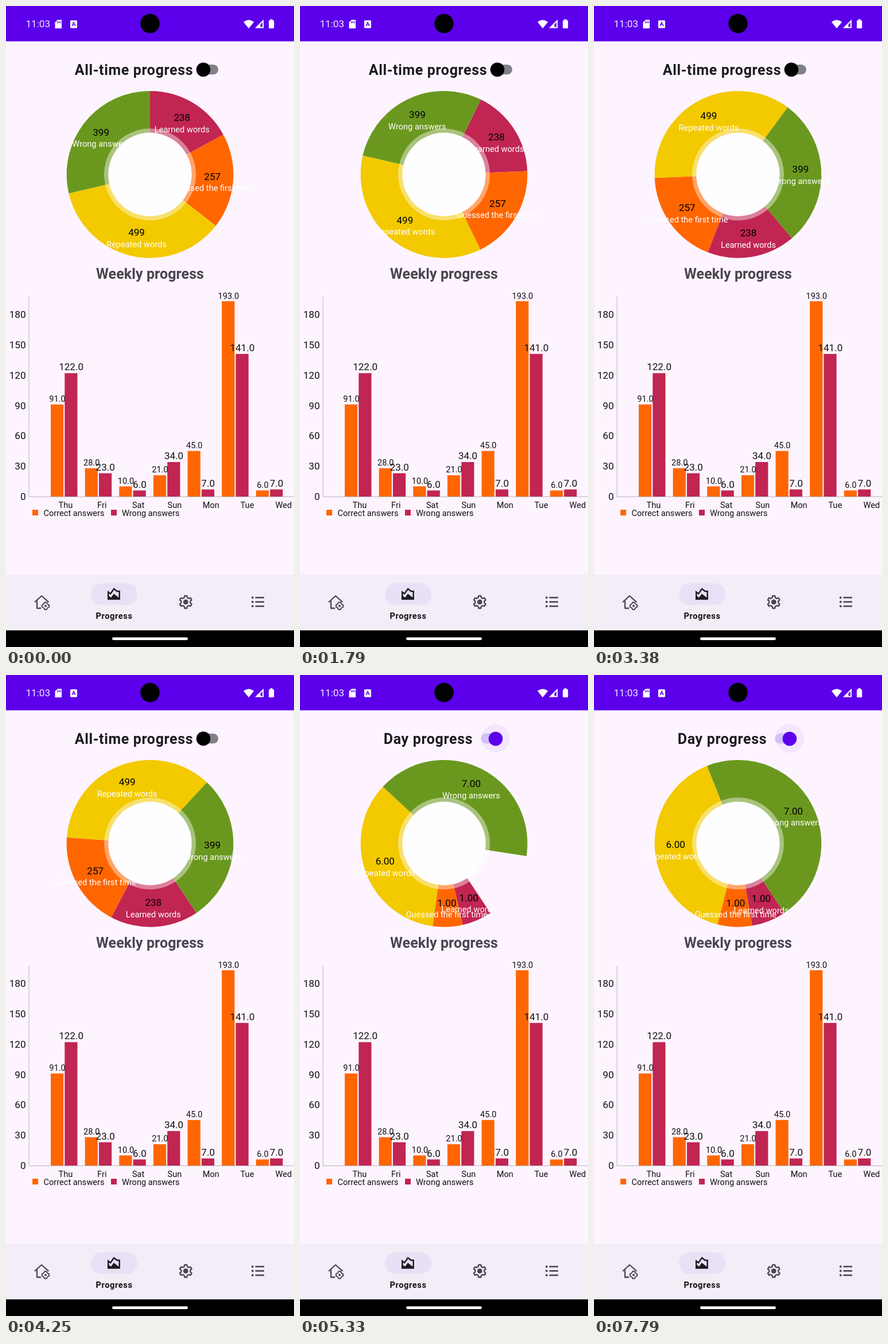
Animation of 502x1116 px, one loop 7870 ms. Source, as an HTML page with a canvas:

```html
<!DOCTYPE html>
<html lang="en">
<head>
<meta charset="utf-8">
<title>Progress</title>
<style>
html, body { margin: 0; width: 100%; height: 100%; overflow: hidden; background: #fdf4ff; }
canvas { display: block; width: 502px; height: 1116px; }
</style>
</head>
<body>
<canvas id="stage"></canvas>
<script>
const W = 502, H = 1116, LOOP = 7870;
const SWITCH_AT = 4463, GROW = 1000, SLIDE = 250;
const BG = '#fdf4ff', PURPLE = '#5c00ec', INK = '#1c1b1f', GREY = '#49454f';
const RED = '#c12552', ORANGE = '#ff6600', YELLOW = '#f3c900', GREEN = '#6a981f';
const PIE = { x: 251, y: 293.3, r: 145.4 };
const SLICES = [
  { name: 'Learned words', color: RED, all: 238, day: 1 },
  { name: 'Guessed the first time', color: ORANGE, all: 257, day: 1 },
  { name: 'Repeated words', color: YELLOW, all: 499, day: 6 },
  { name: 'Wrong answers', color: GREEN, all: 399, day: 7 }
];
const WEEK = [
  ['Thu', 91, 122], ['Fri', 28, 23], ['Sat', 10, 6], ['Sun', 21, 34],
  ['Mon', 45, 7], ['Tue', 193, 141], ['Wed', 6, 7]
];
// Dragged rotation of the ring: time in ms, degrees
const TURN = [[0, 0], [1790, 26.2], [2670, 101], [3380, 139.7], [4250, 146.2]];

const canvas = document.getElementById('stage');
const ctx = canvas.getContext('2d');
const dpr = window.devicePixelRatio || 1;
canvas.width = W * dpr;
canvas.height = H * dpr;

const clamp = v => Math.max(0, Math.min(1, v));
const rad = deg => deg * Math.PI / 180;

function text(str, x, y, size, color, opt = {}) {
  ctx.font = `${opt.weight || 400} ${size}px Roboto, sans-serif`;
  ctx.letterSpacing = (opt.gap || 0) + 'px';
  ctx.textAlign = opt.align || 'center';
  ctx.fillStyle = color;
  ctx.fillText(str, x, y);
}

function rect(x, y, w, h, color, r = 0) {
  ctx.fillStyle = color;
  ctx.beginPath();
  ctx.roundRect(x, y, w, h, r);
  ctx.fill();
}

function disc(x, y, r, color) {
  ctx.fillStyle = color;
  ctx.beginPath();
  ctx.arc(x, y, r, 0, 2 * Math.PI);
  ctx.fill();
}

function trace(points, close) {
  ctx.beginPath();
  points.forEach(([x, y]) => ctx.lineTo(x, y));
  if (close) ctx.closePath();
}

function shape(points, color) {
  trace(points, true);
  ctx.fillStyle = color;
  ctx.fill();
}

function outline(points, color, width, close) {
  trace(points, close);
  ctx.strokeStyle = color;
  ctx.lineWidth = width;
  ctx.stroke();
}

// Monotone cubic through the turn points
const pace = TURN.slice(1).map(([t, a], i) => (a - TURN[i][1]) / (t - TURN[i][0]));
const slope = TURN.map((_, i) => {
  if (i === 0) return pace[0];
  if (i === TURN.length - 1) return 0;
  return 2 * pace[i - 1] * pace[i] / (pace[i - 1] + pace[i]);
});

function turnAt(t) {
  const last = TURN.length - 1;
  if (t >= TURN[last][0]) return TURN[last][1];
  let i = 0;
  while (t >= TURN[i + 1][0]) i++;
  const [t0, a] = TURN[i], [t1, b] = TURN[i + 1];
  const d = t1 - t0, u = (t - t0) / d, v = 1 - u;
  return a * (1 + 2 * u) * v * v + slope[i] * d * u * v * v
    + b * u * u * (3 - 2 * u) - slope[i + 1] * d * u * u * v;
}

function statusBar() {
  rect(0, 0, W, 61.5, PURPLE);
  text('11:03', 34.5, 37, 17.1, '#f4eaff', { align: 'left' });
  shape([[90, 24], [97, 24], [97, 39], [85.5, 39], [85.5, 28.5]], '#fff');
  for (let i = 0; i < 3; i++) rect(89 + i * 2.6, 26.5, 1.3, 3.4, PURPLE);
  rect(112, 25, 12, 13.5, '#fff', 1.5);
  outline([[115, 35], [118, 28], [121, 35]], PURPLE, 1.4);
  rect(116, 32, 4, 1.2, PURPLE);
  disc(251, 30.5, 16.8, '#000');
  ctx.fillStyle = '#fff';
  ctx.beginPath();
  ctx.moveTo(423, 39);
  ctx.lineTo(414, 27.8);
  ctx.quadraticCurveTo(423, 20.5, 432.3, 27.8);
  ctx.fill();
  shape([[434, 38.5], [449, 38.5], [449, 23.5]], '#fff');
  shape([[443.5, 36.5], [447, 36.5], [447, 28.5], [443.5, 32]], PURPLE);
  rect(458, 25, 9.2, 14, '#fff', 1.4);
  rect(460.6, 23, 4, 3, '#fff');
}

function header(t) {
  const style = { weight: 700, gap: 0.65 };
  if (t < SWITCH_AT) {
    text('All-time progress', 223, 120, 25, INK, style);
    rect(336, 102, 34, 17.2, '#828086', 8.6);
    disc(344, 110.7, 12.3, '#000');
  } else {
    const u = clamp((t - SWITCH_AT) / SLIDE);
    const e = u * u * (3 - 2 * u);
    const x = 318 + 23 * e;
    text('Day progress', 223.5, 120, 25, INK, style);
    rect(315, 101.5, 34, 18, '#dccdf8', 9);
    const fade = clamp((t - 4880) / 450);
    disc(x, 110.5, 15 + 10 * e, `rgba(92,0,236,${0.11 - 0.05 * fade})`);
    disc(x, 111, 12.3, PURPLE);
  }
  text('Weekly progress', 251, 475, 25, GREY, { weight: 700, gap: 0.1 });
}

function pie(t) {
  const isDay = t >= SWITCH_AT;
  const key = isDay ? 'day' : 'all';
  const phase = isDay ? clamp((t - SWITCH_AT) / GROW) : 1;
  const total = SLICES.reduce((sum, s) => sum + s[key], 0);
  const start = turnAt(t) - 90;
  let used = 0;
  const labels = [];
  for (const s of SLICES) {
    const size = s[key] / total * 360;
    const a = rad(start + used * phase), b = rad(start + (used + size) * phase);
    ctx.fillStyle = s.color;
    ctx.beginPath();
    ctx.moveTo(PIE.x, PIE.y);
    ctx.arc(PIE.x, PIE.y, PIE.r, a, b);
    ctx.fill();
    const mid = rad(start + (used + size / 2) * phase);
    labels.push({
      s,
      x: PIE.x + PIE.r * 0.75 * Math.cos(mid),
      y: PIE.y + PIE.r * 0.75 * Math.sin(mid)
    });
    used += size;
  }
  disc(PIE.x, PIE.y, PIE.r * 0.55, 'rgba(255,255,255,0.42)');
  disc(PIE.x, PIE.y, PIE.r * 0.5, '#fefdff');
  for (const { s, x, y } of labels) {
    text(isDay ? s.day.toFixed(2) : String(s.all), x, y + 0.3, 17.1, '#000');
    text(s.name, x, y + 20, 14.6, '#fff');
  }
}

function bars() {
  const base = 854, unit = 317 / 180;
  for (let v = 0; v <= 180; v += 30) {
    text(String(v), 34.5, base + 6 - v * unit, 17.1, '#111', { align: 'right' });
  }
  WEEK.forEach(([, right, wrong], i) => {
    const x = 78 + i * 59.65;
    rect(x, base - right * unit, 22.2, right * unit, ORANGE);
    rect(x + 24.3, base - wrong * unit, 22.2, wrong * unit, RED);
  });
  rect(39.5, 506, 1, 348, '#b9b4bd');
  rect(39.5, 854, W - 39.5, 1, '#b9b4bd');
  WEEK.forEach(([day, right, wrong], i) => {
    const x = 89.2 + i * 59.65;
    text(right.toFixed(1), x + 0.4, base - right * unit - 4.6, 14.6, '#111');
    text(wrong.toFixed(1), x + 24.4, base - wrong * unit - 4.8, 17.1, '#111');
    text(day, 104 + i * 63.3, 873.5, 14.6, '#111');
  });
  rect(46, 877, 10, 10, ORANGE);
  text('Correct answers', 65.5, 887.5, 14.6, '#111', { align: 'left' });
  rect(183, 877, 10, 10, RED);
  text('Wrong answers', 202, 887.5, 14.6, '#111', { align: 'left' });
}

function gear(x, y, outer, inner, teeth, width) {
  const points = [];
  const step = 360 / teeth;
  for (let i = 0; i < teeth; i++) {
    const c = i * step - 90;
    [[-0.3, inner], [-0.18, outer], [0.18, outer], [0.3, inner]].forEach(([k, r]) => {
      const a = rad(c + k * step);
      points.push([x + r * Math.cos(a), y + r * Math.sin(a)]);
    });
  }
  outline(points, GREY, width, true);
}

const chartIcon = new Path2D('m17 7-5-4-5 7-4-3v13h18V7h-4zm2 9.95-7-5.45L8 17l-3-2.4V11l2.44 1.83 4.96-6.95L16.3 9H19v7.95z');

function navBar() {
  rect(0, 990, W, 97, '#f3edf7');
  ctx.lineJoin = 'round';

  outline([[50, 1038], [62, 1027], [74.5, 1038]], GREY, 2.3);
  outline([[54, 1035.5], [54, 1048.5], [61, 1048.5]], GREY, 2.3);
  gear(69, 1044.5, 6.4, 5.2, 4, 2);
  disc(69, 1044.5, 2, GREY);

  rect(148, 1005, 81, 38, '#e8e1f6', 19);
  ctx.save();
  ctx.translate(173.3, 1009.3);
  ctx.scale(1.22, 1.22);
  ctx.fillStyle = INK;
  ctx.fill(chartIcon, 'evenodd');
  ctx.restore();
  text('Progress', 188.5, 1067, 14.6, '#111', { weight: 700, gap: 0.6 });

  gear(313.3, 1037.7, 11, 8.2, 6, 2.3);
  disc(313.3, 1037.7, 4.4, GREY);

  for (let i = 0; i < 3; i++) {
    const y = 1030 + i * 7.5;
    disc(429.8, y, 1.9, GREY);
    rect(434.5, y - 1.3, 15.5, 2.6, GREY);
  }
  rect(0, 1087, W, 29, '#000');
  rect(185, 1099.3, 132, 4.6, '#fff', 2.3);
}

function draw(t) {
  ctx.setTransform(dpr, 0, 0, dpr, 0, 0);
  rect(0, 0, W, H, BG);
  statusBar();
  header(t);
  pie(t);
  bars();
  navBar();
}

const begin = performance.now();
function tick() {
  draw((performance.now() - begin) % LOOP);
  requestAnimationFrame(tick);
}
tick();
</script>
</body>
</html>
```
